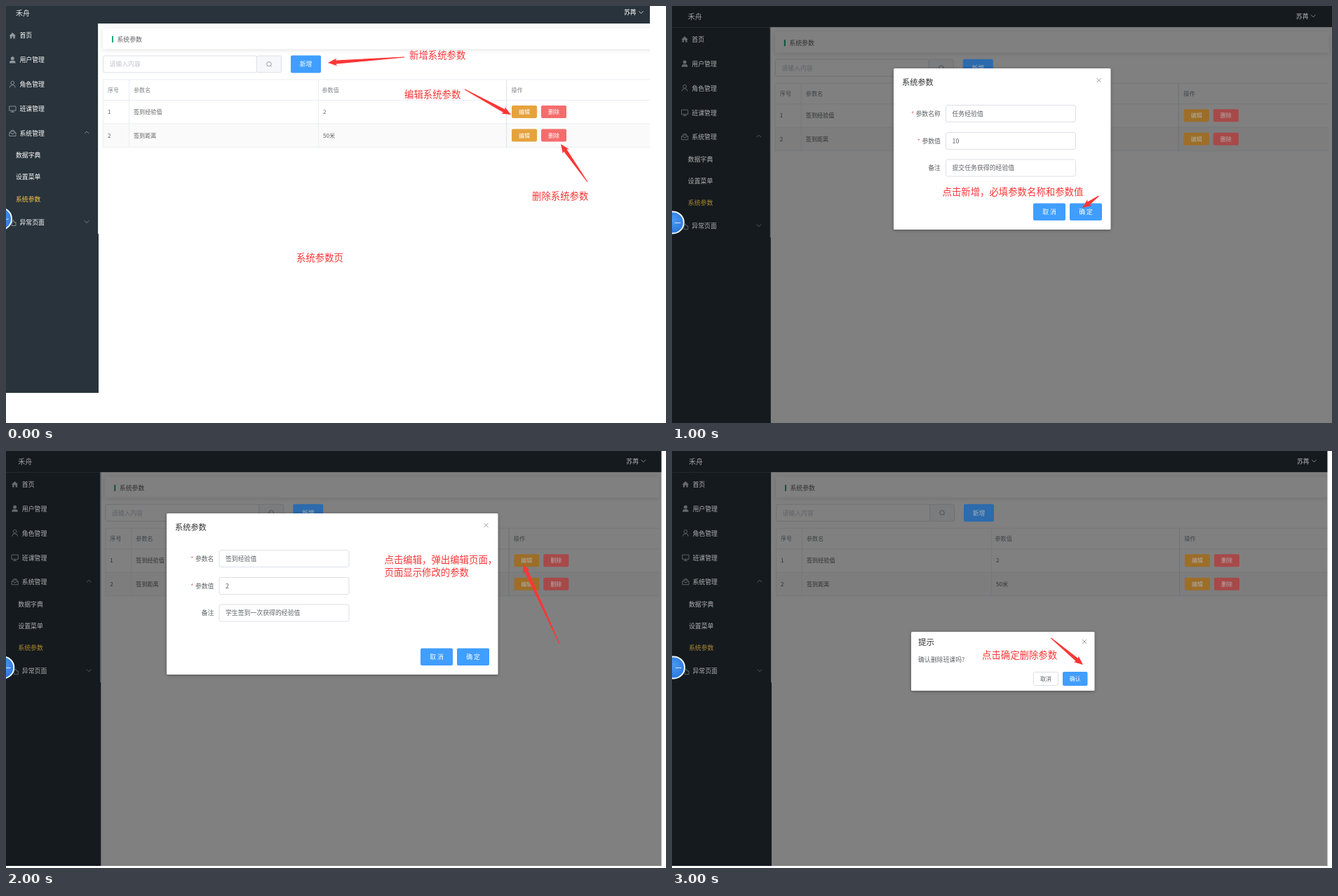
An HTML page for the animation above (4 s loop, 941 px wide and 595 px high).

```html
<!DOCTYPE html>
<html lang="zh-CN">
<head>
<meta charset="utf-8">
<title>系统参数</title>
<style>
html, body { margin: 0; width: 100%; height: 100%; overflow: hidden; background: #fff; }
svg { display: block; }
text { font-family: "Noto Sans CJK SC", "Noto Sans CJK", "Noto Sans", sans-serif; white-space: pre; }
#page { overflow: hidden; }
.dim #base { filter: brightness(.5); }
.dim #bright { filter: brightness(.68); }
.card { filter: drop-shadow(0 1.5px 3px rgba(0,0,0,.12)); }
.dialog { filter: drop-shadow(0 1px 2px rgba(0,0,0,.35)); }
</style>
</head>
<body>
<svg id="stage" width="941" height="595" viewBox="0 0 941 595">
  <defs>
    <radialGradient id="ball" cx=".5" cy=".4" r=".6">
      <stop offset="0" stop-color="#4a9af2"/>
      <stop offset="1" stop-color="#2a76dc"/>
    </radialGradient>
  </defs>
  <svg id="page">
    <g id="base"></g>
    <g id="bright"></g>
    <g id="float"></g>
  </svg>
  <g id="scenes"></g>
</svg>
<script>
const $ = id => document.getElementById(id);
const BLUE = '#409eff', ORANGE = '#e6a23c', RED = '#f56c6c', NOTE = '#fb3636';
const DARK = '#28333b', BODY = '#606266', LINE = '#ebeef5', EDGE = '#dcdfe6';

const rect = (x, y, w, h, fill, more = '') =>
  `<rect x="${x}" y="${y}" width="${w}" height="${h}" fill="${fill}" ${more}/>`;

// y is the vertical middle of the glyphs
const text = (x, y, s, size = 8.9, fill = BODY, more = '') =>
  `<text x="${x}" y="${y + size * .38}" font-size="${size}" fill="${fill}" ${more}>${s}</text>`;

const path = (d, stroke, width = 1, fill = 'none') =>
  `<path d="${d}" stroke="${stroke}" stroke-width="${width}" fill="${fill}"/>`;

const note = (x, y, s) => text(x, y, s, 13.4, NOTE);

const button = (x, y, w, h, s, fill, size = 8.9, ink = '#fff', more = '') =>
  rect(x, y, w, h, fill, 'rx="2" ' + more) +
  text(x + w / 2, y + h / 2, s, size, ink, `text-anchor="middle" font-weight="${ink === '#fff' ? 500 : 400}"`);

const field = (x, y, w, s, ink = BODY) =>
  rect(x + .5, y + .5, w - 1, 24, '#fff', `rx="2.5" stroke="${EDGE}"`) + text(x + 9.5, y + 12.5, s, 8.9, ink);

const chevron = (x, y, up, ink) => {
  const d = up ? -1.6 : 1.6;
  return path(`M${x - 3.2} ${y - d}L${x} ${y + d}L${x + 3.2} ${y - d}`, ink, .9);
};

const cross = (x, y) =>
  path(`M${x - 3} ${y - 3}l6 6m0 -6l-6 6`, '#909399', .9);

// A tapered arrow from tail to tip
function arrow(x1, y1, x2, y2) {
  const len = Math.hypot(x2 - x1, y2 - y1);
  const turn = Math.atan2(y2 - y1, x2 - x1) * 180 / Math.PI;
  const neck = len - 11, barb = len - 13;
  return `<path transform="translate(${x1} ${y1}) rotate(${turn})" fill="${NOTE}"
    d="M0 -.5L${neck} -2.6L${barb} -5.5L${len} 0L${barb} 5.5L${neck} 2.6L0 .5Z"/>`;
}

function buildPage() {
  const cells = [['1', '签到经验值', '2'], ['2', '签到距离', '50米']];
  let base = rect(-20, -10, 1000, 700, '#fff');
  base += rect(138, 31.5, 790, 30, '#fff', 'class="card"');
  base += rect(-20, -10, 1000, 35, DARK) + rect(-20, 25, 152, 600, DARK);
  base += rect(131, 25, 1, 300, '#e6e6e6');
  base += rect(151, 43, 2, 9, '#14a77c') + text(158.5, 47.5, '系统参数');
  base += field(138, 70.5, 220, '请输入内容', '#c0c4cc');
  base += rect(357.5, 71, 35, 24, '#f5f7fa', `rx="2" stroke="${EDGE}"`);
  base += `<circle cx="375" cy="82.8" r="3.2" fill="none" stroke="#909399" stroke-width=".9"/>`;
  base += path('M377.2 85l1.5 1.5', '#909399', .9);

  base += rect(138, 168, 790, 33.5, '#fafafa');
  for (const y of [104.5, 134, 167.5, 201]) base += rect(138, y, 790, 1, LINE);
  for (const x of [138, 175, 445]) base += rect(x, 105, 1, 97, LINE);
  base += rect(713, 105, 1.2, 97, '#e2e5ea');
  [[145, '序号'], [182, '参数名'], [450.5, '参数值'], [720.5, '操作']]
    .forEach(([x, s]) => base += text(x, 119.5, s, 8.1, '#7f8389', 'font-weight="500"'));
  cells.forEach((row, i) => row.forEach((s, j) =>
    base += text([145, 182, 452][j], 151 + i * 33.5, s, 8.1)));

  let bright = text(14, 10, '禾舟', 10, '#e8eaec') + text(881, 9, '苏苒', 8.9, '#fff');
  bright += chevron(905.5, 9, false, '#d5d8db');
  bright += button(406, 70.5, 43, 25, '新增', BLUE);
  for (const y of [142, 175.5])
    bright += button(721, y, 36, 18, '编辑', ORANGE, 8) + button(763, y, 36, 18, '删除', RED, 8);

  [['首页', 42], ['用户管理', 77], ['角色管理', 112], ['班课管理', 147], ['系统管理', 181.5], ['异常页面', 308.5]]
    .forEach(([s, y]) => bright += text(19.5, y, s, 8.9, '#fff', 'font-weight="500"'));
  [['数据字典', 213], ['设置菜单', 244], ['系统参数', 275.5]]
    .forEach(([s, y], i) => bright += text(14, y, s, 8.9, i === 2 ? '#f8c544' : '#fff', 'font-weight="500"'));
  bright += chevron(115, 180.5, true, '#858c93') + chevron(115, 308, false, '#858c93');

  const ink = '#949aa0';
  bright += path('M4.5 42.5L9.3 38L14 42.5H12.8V46.5H10.4V43.5H8.2V46.5H5.8V42.5Z', 'none', 0, ink);
  bright += `<circle cx="9.3" cy="74.8" r="2.5" fill="${ink}"/>`;
  bright += path('M5 81.5Q5 78 7.5 78H11Q13.6 78 13.6 81.5Z', 'none', 0, ink);
  bright += `<circle cx="9.3" cy="109.7" r="2.4" fill="none" stroke="${ink}" stroke-width=".9"/>`;
  bright += path('M5.3 116.5Q5.5 112.7 9.3 112.7T13.3 116.5', ink, .9);
  bright += path('M4.7 143H14V149.2H4.7ZM9.3 149.2V151.2M6.6 151.2H12', ink, .9);
  bright += path('M4.8 181L6.5 179H12.2L14 181V185.5H4.8ZM4.8 181H7.5L8.3 182.6H10.5L11.3 181H14M6.5 179L8 177.3H11L12.2 179', ink, .9);
  bright += path('M8.2 313.5V309L10.5 305.5L11.5 308.7H14V313.5Z', ink, .9);

  $('base').innerHTML = base;
  $('bright').innerHTML = bright;
  $('float').innerHTML =
    '<circle cx="-7.5" cy="303.7" r="15.5" fill="url(#ball)" stroke="#eef4fb" stroke-width="2"/>' +
    path('M-5 304.2H3.5', '#d6e8ff', 1);
}

const panel = (x, y, w, h) => rect(x, y, w, h, '#fff', 'rx="1.5" class="dialog"');

function form(x, w, labels, values, fieldX, fieldW, buttonX) {
  let s = panel(x, 89, w, 230) + text(x + 12, 109, '系统参数', 11.2, '#303133') + cross(x + w - 17, 106);
  labels.forEach((label, i) => {
    const y = [141, 180, 218.5][i], end = fieldX - 7;
    s += text(end, y + 12.5, label, 8.9, BODY, 'text-anchor="end"');
    if (i < 2) s += text(end - label.length * 8.9 - 6.5, y + 13, '*', 8.9, RED);
    s += field(fieldX, y, fieldW, values[i]);
  });
  return s + button(buttonX, 281.5, 46, 24.5, '取 消', BLUE) + button(buttonX + 52, 281.5, 46, 24.5, '确 定', BLUE);
}

const overview = () =>
  note(575, 69.5, '新增系统参数') + arrow(568, 73, 459, 81) +
  note(568, 125.5, '编辑系统参数') + arrow(654, 119, 720, 155) +
  note(750, 271, '删除系统参数') + arrow(829, 251, 791, 197) +
  note(414, 358.5, '系统参数页');

const addForm = () =>
  form(316, 309.5, ['参数名称', '参数值', '备注'], ['任务经验值', '10', '提交任务获得的经验值'], 390, 186, 515) +
  note(385.5, 265, '点击新增，必填参数名称和参数值') + arrow(608.5, 271, 585, 288);

const editForm = () =>
  form(229, 472.5, ['参数名', '参数值', '备注'], ['签到经验值', '2', '学生签到一次获得的经验值'], 303.5, 186, 591) +
  note(539.5, 154.5, '点击编辑，弹出编辑页面，') + note(539.5, 173, '页面显示修改的参数') +
  arrow(789, 275, 737, 161);

const removeBox = () =>
  panel(341, 258, 261.5, 84) + text(351, 273, '提示', 11.5, '#303133') + cross(588, 272) +
  text(351, 298, '确认删除班课吗?') +
  button(515.5, 315.5, 35, 19, '取消', '#fff', 8, BODY, `stroke="${EDGE}"`) +
  button(557, 315, 35.5, 20, '确认', BLUE, 8) +
  note(442, 290.5, '点击确定删除参数') + arrow(540.5, 267, 586, 305);

const scenes = [
  { draw: overview, x: 0, y: 0, w: 918, h: 552 },
  { draw: addForm, x: 8.8, y: 5.2, w: 941, h: 595 },
  { draw: editForm, x: 3.3, y: 5.2, w: 934.5, h: 592 },
  { draw: removeBox, x: 10, y: 5.2, w: 934.5, h: 592 }
];

let shown = -1;
function show(ms) {
  const n = Math.floor(ms / 1000) % scenes.length;
  if (n === shown) return;
  shown = n;
  const { x, y, w, h } = scenes[n];
  $('page').setAttribute('width', w);
  $('page').setAttribute('height', h);
  for (const id of ['base', 'bright', 'float']) $(id).setAttribute('transform', `translate(${x} ${y})`);
  $('stage').classList.toggle('dim', n > 0);
  [...$('scenes').children].forEach((g, i) => g.style.display = i === n ? '' : 'none');
}

buildPage();
$('scenes').innerHTML = scenes.map(s => `<g>${s.draw()}</g>`).join('');
const start = performance.now();
function tick() {
  show(performance.now() - start);
  requestAnimationFrame(tick);
}
tick();
</script>
</body>
</html>
```
